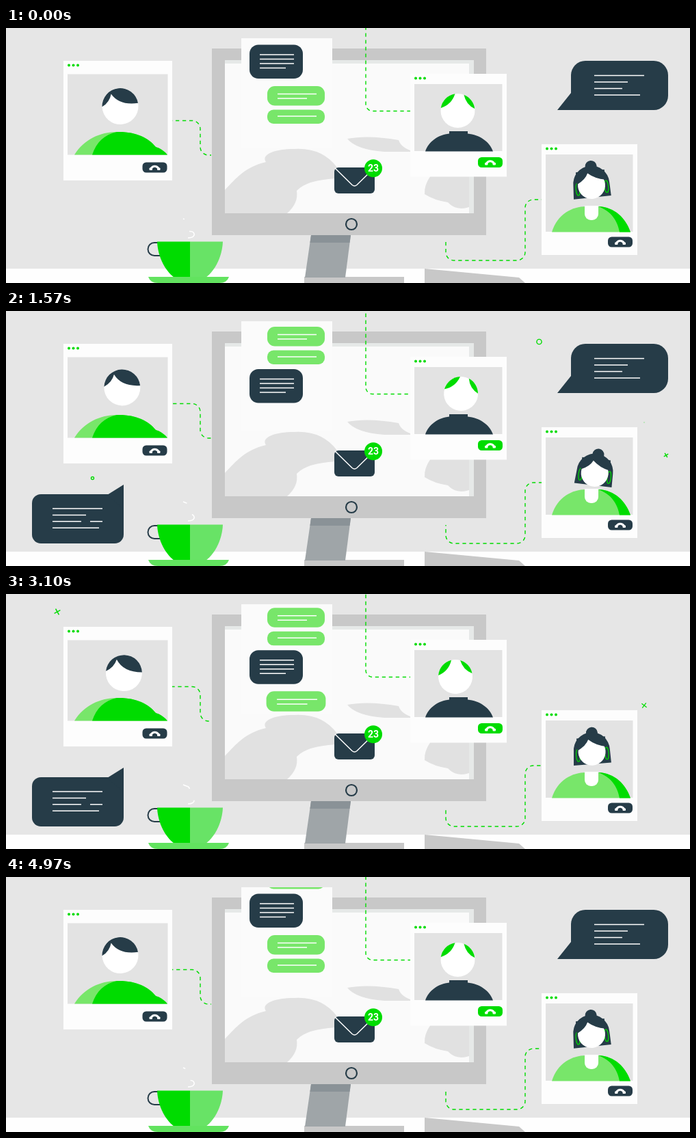
Write an HTML page with a canvas that moves like this. It is 1000 px wide and 373 px high and loops after 5.01 s.

```html
<!DOCTYPE html>
<html lang="en">
<head>
<meta charset="utf-8">
<title>Video call desk</title>
<style>
html, body { margin: 0; width: 100%; height: 100%; overflow: hidden; background: #e6e6e6; }
canvas { display: block; width: 100%; height: 100%; }
</style>
</head>
<body>
<canvas id="stage"></canvas>
<script>
const W = 1000, H = 373, LOOP = 5010;
const DARK = '#263c48', GREEN = '#00dc00', LIGHT = '#78e66a', WHITE = '#fff',
      PAPER = '#fdfdfd', WALL = '#e6e6e6', PANE = '#e3e3e3', METAL = '#c8c8c8', SKIN = '#e1e1e1';
const canvas = document.getElementById('stage');
const c = canvas.getContext('2d');

// Motion rules
const clamp = u => Math.min(1, Math.max(0, u));
const ease = u => u * u * (3 - 2 * u);
const ramp = (t, a, b) => ease(clamp((t - a) / (b - a)));
const nod = (t, start, peak, end) => ramp(t, start, peak) - ramp(t, peak, end);
// Grows past full size, then settles
const popIn = (t, start, rise, settle, over) =>
  ramp(t, start, start + rise) * over -
  ramp(t, start + rise, start + rise + settle) * (over - 1);

// Drawing helpers
function fill(d, color) { c.fillStyle = color; c.fill(new Path2D(d)); }
function stroke(d, color, width) {
  c.strokeStyle = color; c.lineWidth = width; c.stroke(new Path2D(d));
}
function rect(x, y, w, h, color) { c.fillStyle = color; c.fillRect(x, y, w, h); }
function round(x, y, w, h, r, color) {
  c.fillStyle = color;
  c.beginPath(); c.roundRect(x, y, w, h, r); c.fill();
}
function disc(x, y, r, color) {
  c.fillStyle = color;
  c.beginPath(); c.arc(x, y, r, 0, 7); c.fill();
}
function ring(x, y, r, color, width) {
  c.strokeStyle = color; c.lineWidth = width;
  c.beginPath(); c.arc(x, y, r, 0, 7); c.stroke();
}
function textLines(x, y, gap, widths) {
  widths.forEach((w, i) => stroke(`M${x} ${y + i * gap}h${w}`, WHITE, 1.5));
}
function at(x, y, scale, degrees, draw) {
  if (scale <= 0.01) return;
  c.save();
  c.translate(x, y); c.rotate(degrees * Math.PI / 180); c.scale(scale, scale);
  draw();
  c.restore();
}
function trail(d, color, width, dash, gap, offset) {
  c.save();
  c.setLineDash([dash, gap]);
  c.lineDashOffset = offset;
  stroke(d, color, width);
  c.restore();
}

function drawRoom() {
  rect(0, 0, W, H, WALL);
  rect(0, 352, W, 21, '#fefefe');
  fill('M612 352L750 365L759 373H612Z', METAL);
}

function drawMonitor() {
  rect(436, 364, 146, 9, METAL);
  fill('M446 303H504L496 365H437Z', '#9fa5a8');
  fill('M446 303H504L502.5 314H444.5Z', '#8a9297');
  rect(301, 30, 401, 273, METAL);
  rect(320, 47, 364, 224, '#e6e9e8');
  rect(320, 52, 357, 219, '#fafafa');
  fill('M320 237C336 220 350 203 380 196C372 184 396 177 420 177Q462 174 484 204V220' +
       'Q440 222 425 238Q428 256 411 271H320Z', SKIN);
  fill('M499 162Q530 156 574 164Q578 176 597 181H553Q512 178 499 162Z', SKIN);
  fill('M621 216H677V262Q658 268 646 255Q626 252 612 243Q611 230 621 216Z', SKIN);
  ring(505, 287, 8, DARK, 2.2);
}

function drawLinks(t) {
  const run = t / LOOP * 140;
  const link = (d, shift) => trail(d, GREEN, 1.4, 5.3, 4.7, run + shift);
  link('M526 0V111.5a10 10 0 0 0 10 10H592', -7.5);
  link('M243 135.5H272a12 12 0 0 1 12 12V174a12 12 0 0 0 12 12H300', -5);
  link('M643 313V328a12 12 0 0 0 12 12H747a12 12 0 0 0 12 -12V263a12 12 0 0 1 12 -12H783', 0);
}

function drawCup(t) {
  trail('M266 307C274 307 277 303 274 299Q272 297 268 297.5H259C253 298 253 290 259 290' +
        'H264C270 290 270 282 264 281L259 279', WHITE, 1.5, 22, 44, 1 - t / LOOP * 3 * 66);
  stroke('M224 314H217a9.5 9.5 0 0 0 0 19H226', DARK, 2);
  const bowl = new Path2D('M221 312.5H317C316 336 304 358 289 367H249C234 358 222 336 221 312.5Z');
  c.save(); c.clip(bowl);
  rect(221, 312, 48, 56, GREEN);
  rect(269, 312, 48, 56, '#68e366');
  c.restore();
  fill('M208 364H326Q323 373 312 373H222Q211 373 208 364Z', '#62e35f');
}

function drawMail() {
  round(480, 204, 59, 38, 6, DARK);
  stroke('M481 205L506 229.5Q509.5 232.5 513 229.5L538 205', WHITE, 1.5);
  disc(537, 205.3, 13, GREEN);
  c.fillStyle = WHITE;
  c.font = 'bold 14px Roboto, sans-serif';
  c.textAlign = 'center';
  c.fillText('23', 537, 210.3);
}

// Chat messages: size, corner, colour and text widths
const DARK_NOTE = { x: 356, w: 78, h: 49.5, r: 13, color: DARK, first: 14.5, lines: [50, 50, 50, 38] };
const TALL_NOTE = { x: 382, w: 84, h: 28.5, r: 11, color: LIGHT, first: 11.5, lines: [57, 43] };
const LOW_NOTE = { x: 382, w: 84, h: 20.5, r: 9, color: LIGHT, first: 9.5, lines: [57] };

function note(kind, y, scale = 1) {
  const { x, w, h, r, color, first, lines } = kind;
  at(x + w / 2, y + h / 2, scale, 0, () => {
    c.translate(-w / 2, -h / 2);
    round(0, 0, w, h, r, color);
    textLines(15, first, 6.5, lines);
  });
}

function drawChat(t) {
  const first = 62 * ramp(t, 1030, 1420), second = 60.5 * ramp(t, 3050, 3450);
  const arrive = start => popIn(t, start, 180, 110, 1.08);
  rect(344, 15, 133, 161, '#fbfbfb');
  c.save();
  c.beginPath(); c.rect(330, 15, 170, 170); c.clip();
  note(DARK_NOTE, 24.5 - first - second);
  note(TALL_NOTE, 85 - first - second);
  note(LOW_NOTE, 119.5 - first - second);
  note(DARK_NOTE, 85 - second, arrive(1260));
  note(TALL_NOTE, 145.5 - second, arrive(2860));
  note(LOW_NOTE, 119.5, arrive(3640));
  c.restore();

  const typing = popIn(t, 2200, 170, 110, 1.1) * (1 - ramp(t, 2760, 2880));
  at(466, 156, typing, 0, () => {
    round(-15, -9, 30, 17.5, 8, LIGHT);
    fill('M-13 2L-16 9H-5Z', LIGHT);
    for (let i = -1; i <= 1; i++) disc(i * 6.5, -0.5, 2, WHITE);
  });
}

function drawCard(x, y, w, h, paneHeight) {
  rect(x, y, w, h, PAPER);
  rect(x + 6, y + (w > 150 ? 19.5 : 15), w - 12.5, paneHeight, PANE);
  for (let i = 0; i < 3; i++) disc(x + 8 + i * 6.5, y + 6.5, 2, GREEN);
}
function drawCallKey(x, y, color) {
  round(x, y, 36, 15, 5.5, color);
  c.strokeStyle = WHITE; c.lineWidth = 3;
  c.beginPath(); c.arc(x + 18, y + 12, 6.2, Math.PI * 1.08, Math.PI * 1.92); c.stroke();
  for (const side of [10, 21.5]) round(x + side, y + 8, 4.5, 3.5, 1, WHITE);
}

function drawCaller1(t) {
  drawCard(84, 48, 159, 175, 118);
  const shoulder = 'C188 151 208 160 219 174Q229 177 236 185.5Z';
  fill('M100 185.5C114 163 138 152 162 152' + shoulder, LIGHT);
  fill('M126 185.5C132 167 144 156 162 152' + shoulder, GREEN);
  const sway = 10.5 * nod(t, 1070, 2530, 3700) + 5 * nod(t, 3570, 4070, 4970)
             - 1.7 * nod(t, 0, 1070, 1570);
  const lift = 4 * nod(t, 0, 1170, 2530);
  at(167 + sway, 114.5 + sway * 0.2 - lift, 1, 1.5 * sway - 4, () => {
    disc(0, 0, 26.5, WHITE);
    fill('M-26.5 -1A26.5 26.5 0 0 1 26.3 -3Q-1 -1 -12 -19Q-15 -7 -26.5 -1Z', DARK);
  });
  drawCallKey(199.5, 196.5, DARK);
}

function drawCaller2(t) {
  drawCard(591, 67, 141, 150.5, 98);
  fill('M613 180.5C618 166 632 156 648 154.5V151H675V154.5C692 156 707 166 712 180.5Z', DARK);
  const sway = 6 * nod(t, 0, 1070, 2700) - 4.7 * nod(t, 1570, 2530, 4200);
  at(660.5 + sway, 121, 1, 1.4 * sway, () => {
    disc(0, 0, 25, WHITE);
    fill('M-24.7 -4A25 25 0 0 1 -4 -24.7Q-9 -9 -24.7 -4Z', GREEN);
    fill('M9 -23.3A25 25 0 0 1 24.7 -3Q12 -9 9 -23.3Z', GREEN);
  });
  drawCallKey(690, 189, GREEN);
}

function drawCaller3(t) {
  drawCard(783, 170, 140, 162, 113);
  fill('M798 298.5C806 272 828 261 848 261H866C890 262 906 278 913 298.5Z', LIGHT);
  fill('M866 261C885 268 894 282 897 298.5H913C906 278 890 262 866 261Z', GREEN);
  round(846, 260, 20, 21, [0, 0, 9, 9], WHITE);
  const tilt = 11 * nod(t, 400, 1070, 1570) + 13 * nod(t, 200, 1400, 3560)
             + 16 * nod(t, 3570, 4070, 4950);
  const dip = 7.5 * nod(t, 200, 1200, 3560);
  at(856 + tilt * 0.37, 230 + dip, 1, tilt - 6, () => {
    disc(2, -27.5, 8.5, DARK);
    fill('M-28 18L-26.5 -2A26.5 26.5 0 0 1 26.5 -2L27 18Z', DARK);
    c.strokeStyle = GREEN; c.lineWidth = 1.2;
    for (const side of [-20.5, 21.5]) {
      c.beginPath(); c.ellipse(side, 4, 2.8, 9, 0, 0, 7); c.stroke();
    }
    disc(0, 0, 20, WHITE);
    fill('M-21 -3Q-8 -9 -4 -18Q6 -9 21 -6V-21H-21Z', DARK);
  });
  drawCallKey(880, 305.5, DARK);
}

function drawSpeech(t) {
  const left = popIn(t, 150, 255, 200, 1.15) * (1 - ramp(t, 3690, 3960));
  at(105, 300, left, 0, () => {
    round(-67, -32, 134, 72, 13, DARK);
    fill('M43 -31L67 -46V-10Z', DARK);
    textLines(-37, -11, 9.4, [73, 49, 42, 68]);
    textLines(18, 7.8, 0, [18]);
  });
  const right = 1 - ramp(t, 2050, 2320) + popIn(t, 4490, 255, 205, 1.15);
  at(887, 84, right, 0, () => {
    round(-61, -36, 142, 72, 21, DARK);
    fill('M-61 11L-81 36H-37Z', DARK);
    textLines(-27, -14.5, 9.5, [73, 49, 41, 67]);
  });
}

const sparkSize = age => popIn(age, 0, 200, 180, 1.35) * (1 - ramp(age, 1400, 2050));

function drawRing(t, x, y, r, start) {
  const s = sparkSize(t - start);
  if (s > 0.01) ring(x, y, r * s, GREEN, Math.min(1.4, 2 * s));
}
function drawCross(t, x, y, arm, start, turn) {
  const age = t - start;
  at(x, y, sparkSize(age), turn + age * 0.03, () =>
    stroke(`M${-arm} 0H${arm}M0 ${-arm}V${arm}`, GREEN, 1.5));
}
function drawSparks(t) {
  drawRing(t, 126.5, 244.5, 2, 530);
  drawRing(t, 779.5, 45, 3.6, 330);
  drawCross(t, 965, 211, 3.7, 900, 40);
  drawCross(t, 933, 163, 5.5, 1530, -10);
  drawCross(t, 75, 26, 5, 2640, -43);
}

const layers = [drawRoom, drawMonitor, drawCup, drawChat, drawMail, drawLinks,
                drawCaller1, drawCaller2, drawCaller3, drawSpeech, drawSparks];

function fit() {
  const ratio = window.devicePixelRatio || 1;
  const w = Math.round(innerWidth * ratio), h = Math.round(innerHeight * ratio);
  if (canvas.width !== w || canvas.height !== h) { canvas.width = w; canvas.height = h; }
  c.setTransform(w / W, 0, 0, h / H, 0, 0);
}

const began = performance.now();
function tick() {
  const t = (performance.now() - began) % LOOP;
  fit();
  for (const layer of layers) layer(t);
  requestAnimationFrame(tick);
}
tick();
</script>
</body>
</html>
```
